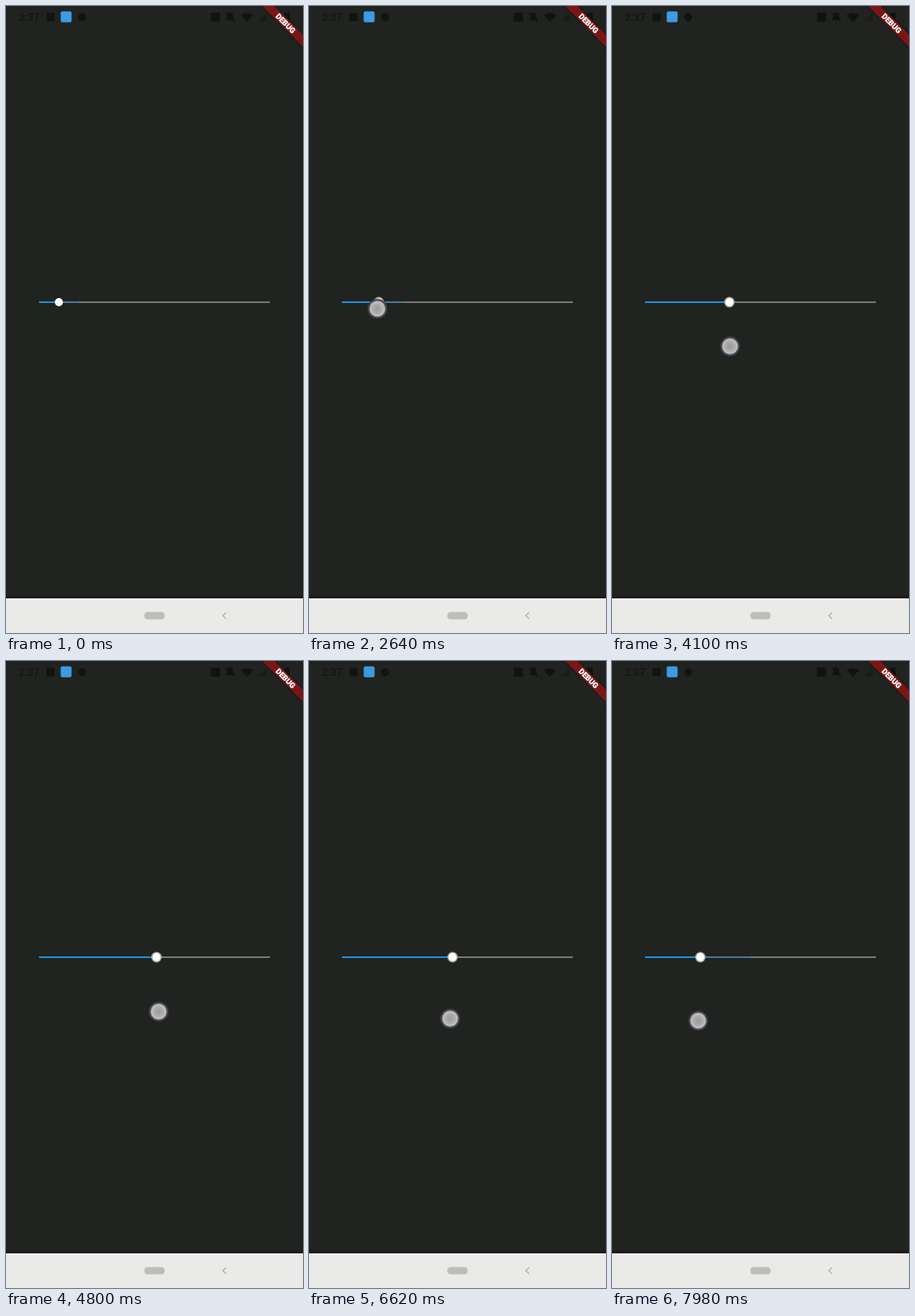
Write an HTML page that moves like this. It is 360 by 760 pixels and loops after 8 s.

```html
<!DOCTYPE html>
<html lang="en">
<head>
<meta charset="utf-8">
<title>Buffered slider</title>
<style>
  html, body { margin: 0; width: 100%; height: 100%; overflow: hidden; background: #20231f; }
  svg { display: block; width: 360px; height: 760px; }
  text { font-family: Roboto, "Open Sans", sans-serif; }
</style>
</head>
<body>
<svg viewBox="0 0 360 760">
  <defs>
    <radialGradient id="touchFill">
      <stop offset="0" stop-color="#9b9c99"/>
      <stop offset=".6" stop-color="#adaeac"/>
      <stop offset=".9" stop-color="#bfbfc1"/>
      <stop offset="1" stop-color="#aeaeb5"/>
    </radialGradient>
    <radialGradient id="touchHalo">
      <stop offset=".7" stop-color="#64646f"/>
      <stop offset=".85" stop-color="#454650"/>
      <stop offset="1" stop-color="#20231f" stop-opacity="0"/>
    </radialGradient>
    <filter id="soft" x="-20%" y="-60%" width="140%" height="220%">
      <feGaussianBlur stdDeviation="1.6"/>
    </filter>
  </defs>

  <rect width="360" height="760" fill="#20231f"/>

  <!-- Status bar -->
  <g fill="#111310">
    <text x="15.5" y="18" font-size="13">2:37</text>
    <rect x="49" y="8.5" width="10" height="10" rx="1"/>
    <rect x="66.3" y="6.6" width="13.2" height="13.2" rx="2" fill="#3c9be4"/>
    <circle cx="92.3" cy="13.6" r="4.8"/>
    <rect x="248.5" y="8" width="11" height="11" rx="1"/>
    <path d="M267 17v-1.3l1.2-1.2v-2.8q0-3 2.6-3.6v-.6h2v.6q2.6.6 2.6 3.6v2.8l1.2 1.2V17zM270.6 17.8h2.4q-1.2 1.8-2.4 0z"/>
    <path d="M266.3 8l11.2 11" fill="none" stroke="#111310" stroke-width="1.2"/>
    <path d="M284.5 11q7.5-5.2 15 0L292 19.5z"/>
    <path d="M305.5 18.5h10.5V8z" fill="#1a1c19"/>
    <rect x="337.5" y="8" width="6.5" height="11" rx="1"/>
  </g>

  <!-- Corner banner -->
  <g transform="translate(360 0) rotate(45)">
    <rect x="-38" y="24.5" width="76" height="10.5" fill="#000" opacity=".5" filter="url(#soft)"/>
    <rect x="-38" y="24.5" width="76" height="10.5" fill="#7b1517"/>
    <text y="33.1" font-size="9.2" font-weight="900" fill="#fff" stroke="#fff" stroke-width=".25" text-anchor="middle">DEBUG</text>
  </g>

  <!-- Navigation bar -->
  <rect y="714" width="360" height="4" fill="#221a20"/>
  <rect y="718" width="360" height="42" fill="#eaebe9"/>
  <rect x="167.5" y="734.5" width="25" height="9" rx="4.5" fill="#bdbebc"/>
  <path d="M266.8 735.2l-4 3.8 4 3.8" fill="none" stroke="#a6a7a5" stroke-width="1.1"/>

  <!-- Slider -->
  <g id="slider">
    <rect x="40" y="358" width="280" height="2" rx=".8" fill="#777875"/>
    <rect id="buffered" x="40" y="358" height="2" rx=".8" fill="#43779e"/>
    <rect id="played" x="40" y="358" height="2" rx=".8" fill="#218ede"/>
    <circle id="glow" cy="359" r="6.4" fill="#a3a4a1"/>
    <circle id="thumb" cy="359" r="4.9" fill="#fff"/>
  </g>
  <g id="touch">
    <circle r="13" fill="url(#touchHalo)"/>
    <circle r="9.5" fill="url(#touchFill)"/>
  </g>
</svg>
<script>
const LOOP = 8000, PRESS = 2340, LEFT = 40;
const [buffered, played, glow, thumb, touch] =
  ['buffered', 'played', 'glow', 'thumb', 'touch'].map(id => document.getElementById(id));

const point = (x, y) => ({ x, y });
const grab = point(75, 361), middle = point(143, 412.5), far = point(208.5, 432), back = point(104.5, 436);

// Each stroke of the finger slows down by its power; 1 is steady
const strokes = [
  { start: 2450, end: 4100, from: grab, to: middle, power: 1 },
  { start: 4100, end: 5780, from: middle, to: far, power: 1.9 },
  { start: 6200, end: 7980, from: far, to: back, power: 1.65 }
];

function finger(t) {
  const { start, end, from, to, power } = strokes.findLast(s => s.start <= t) || strokes[0];
  const u = Math.min(1, Math.max(0, (t - start) / (end - start)));
  const eased = 1 - (1 - u) ** power;
  return point(from.x + (to.x - from.x) * eased, from.y + (to.y - from.y) * eased);
}

// The thumb trails the finger and moves slightly less far
function draggedThumb(t) {
  const { x } = finger(t - 40);
  return x + (165 - x) * .04;
}

function draw(t) {
  const pressed = t >= PRESS;
  const x = pressed ? draggedThumb(t) : 64.1 + t * .005;
  buffered.setAttribute('width', 88 + t * .01 - LEFT);
  played.setAttribute('width', x - LEFT);
  for (const el of [thumb, glow]) el.setAttribute('cx', x);
  for (const el of [glow, touch]) el.setAttribute('visibility', pressed ? 'visible' : 'hidden');
  const tip = finger(t);
  touch.setAttribute('transform', `translate(${tip.x} ${tip.y})`);
}

const start = performance.now();
function tick() {
  draw((performance.now() - start) % LOOP);
  requestAnimationFrame(tick);
}
draw(0);
requestAnimationFrame(tick);
</script>
</body>
</html>
```
